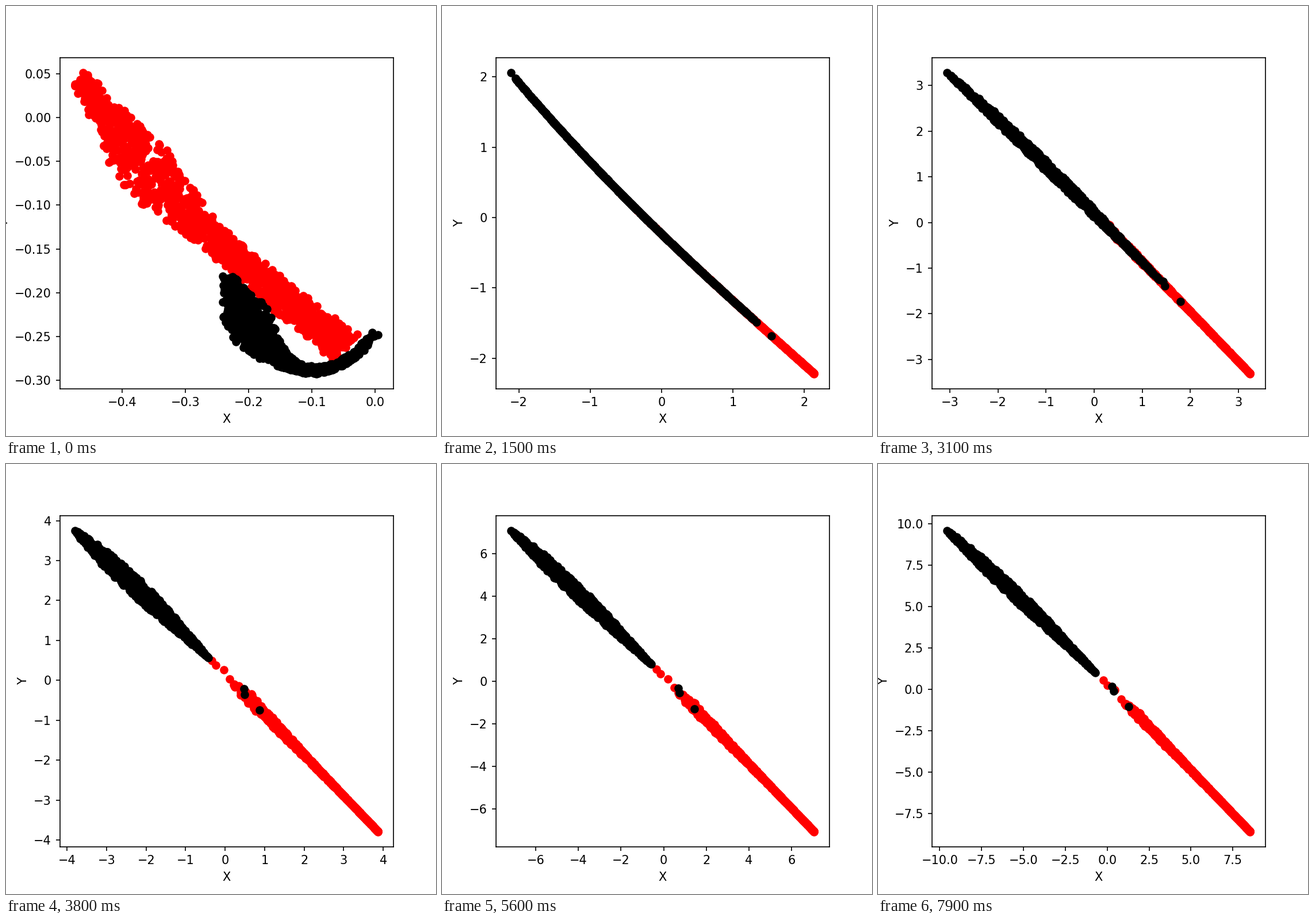
Recreate the animation shown at these times as a matplotlib script. Size 748 by 748 pixels, loop 8000 ms.

```python
import numpy as np
import matplotlib.pyplot as plt
from matplotlib.animation import FuncAnimation

FRAMES, COUNT = 80, 1100
MIX_END = 15  # the opening clouds have melted into the diagonal by here
rng = np.random.default_rng(7)

red_s = rng.uniform(0, 1, COUNT)
black_s = rng.beta(1.8, 1.6, COUNT)
red_s[:2] = black_s[:2] = 0, 1
red_v, black_v = 2 * rng.beta(1.6, 1.6, (2, COUNT)) - 1
black_v[:2] = 1


def bump(s, centre, width):
    return np.exp(-((s - centre) / width) ** 2)


def bezier(s, points):
    p0, p1, p2, p3 = np.array(points, float)
    s = s[:, None]
    r = 1 - s
    return r**3 * p0 + 3 * r * r * s * p1 + 3 * r * s * s * p2 + s**3 * p3


def opening():
    """Wide red streak and black crescent, scaled to the unit square."""
    s = red_s
    half = red_v * (12 + 10 * s + 21 * bump(s, 0.25, 0.16))
    x = 130 + 460 * s
    y = 125 + 463 * s + 48 * np.sin(np.pi * s**0.7)
    red = np.column_stack([x + half, y - half])

    s = black_s
    path = [(386, 465), (402, 535), (509, 724), (642, 563)]
    slope = bezier(s + 1e-3, path) - bezier(s - 1e-3, path)
    slope /= np.linalg.norm(slope, axis=1)[:, None]
    half = black_v * (6 + 35 * bump(s, 0.3, 0.2))
    normal = np.column_stack([-slope[:, 1], slope[:, 0]])
    black = bezier(s, path) + normal * half[:, None]

    both = np.vstack([red, black])
    low, high = both.min(axis=0), both.max(axis=0)
    return (red - low) / (high - low), (black - low) / (high - low)


def diagonal(t):
    """Both classes along the falling diagonal of the unit square."""
    stops = [15, 31, 38, 79]
    end = np.interp(t, stops, [0.80, 0.70, 0.44, 0.49])
    tail = np.interp(t, stops, [0.86, 0.77, 0.61, 0.60])
    start = np.interp(t, stops, [0.39, 0.46, 0.51, 0.575])
    sag = np.interp(t, stops[:2], [0.04, -0.018])
    width = np.interp(t, [15, 31, 38, 56, 79], [0, 0.01, 0.019, 0.014, 0.012])

    def place(u, half):
        y = u + sag * np.sin(np.pi * np.clip(u, 0, 1) ** 0.8)
        return np.column_stack([u + half, y - half])

    s = red_s**0.6
    u = start + (1 - start) * s
    u[-3:] = start - np.array([0.06, 0.045, 0.025])
    red = place(u, red_v * 0.85 * width * (1 - s) ** 2 * np.minimum(1, 8 * s))

    u = end * black_s
    u[-3:] = tail - np.array([0, 0.05, 0.06])
    black = place(u, black_v * width * np.sin(np.pi * black_s**0.8))
    return red, black


def reach(t):
    """Data position of the top left and bottom right corners."""
    stops = [15, 31, 38, 56, 69, 79]
    left = np.interp(t, stops, [2.11, 3.06, 3.80, 7.16, 8.72, 9.57])
    right = np.interp(t, stops, [2.14, 3.24, 3.87, 7.05, 8.04, 8.53])
    top = np.interp(t, stops, [2.06, 3.28, 3.75, 7.07, 8.70, 9.60])
    bottom = np.interp(t, stops, [2.22, 3.31, 3.79, 7.08, 8.09, 8.59])
    return np.array([-left, top]), np.array([right, -bottom])


def to_data(clouds, corners):
    first, last = corners
    return np.array([first + c * (last - first) for c in clouds])


OPENING = to_data(opening(), (np.array([-0.4745, 0.0513]),
                              np.array([0.0045, -0.2925])))

fig, ax = plt.subplots(figsize=(4.98667, 4.98667), dpi=150)
fig.subplots_adjust(left=0.1251, right=0.9006)
dots = [ax.scatter([], [], color=c) for c in ("red", "black")]
ax.set_xlabel("X")
ax.set_ylabel("Y")


def update(n):
    t = max(n, MIX_END)
    mix = min(n / MIX_END, 1)
    clouds = (1 - mix) * OPENING + mix * to_data(diagonal(t), reach(t))
    for dot, cloud in zip(dots, clouds):
        dot.set_offsets(cloud)
    low, high = clouds.min(axis=(0, 1)), clouds.max(axis=(0, 1))
    pad = 0.05 * (high - low)
    ax.set_xlim(low[0] - pad[0], high[0] + pad[0])
    ax.set_ylim(low[1] - pad[1], high[1] + pad[1])
    return dots


anim = FuncAnimation(fig, update, frames=FRAMES, interval=100,
                     repeat=True, repeat_delay=0)
plt.show()
```
